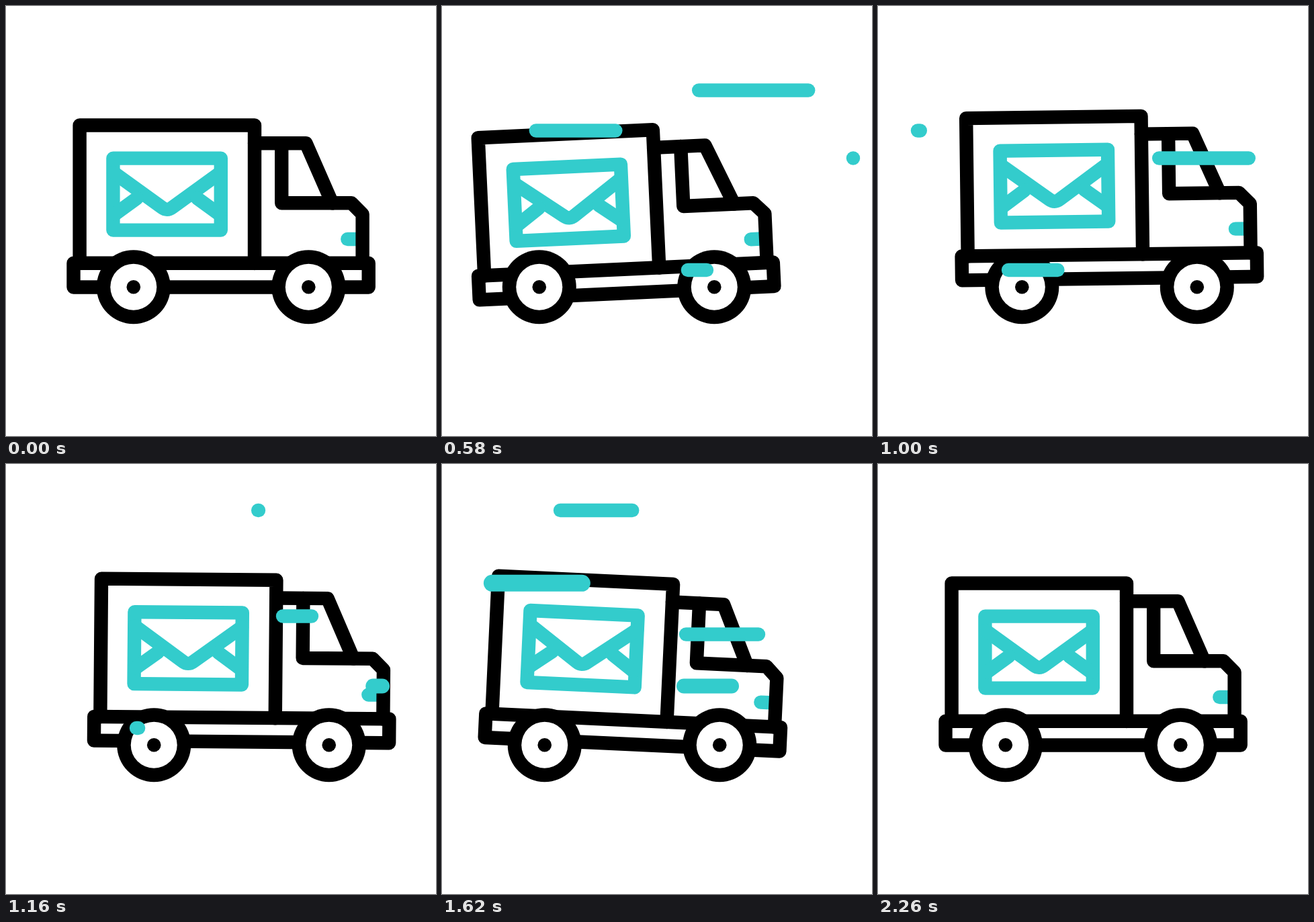
Animation, 640 px wide and 640 px high, one loop 2.4 s. Source, as an HTML page with a canvas:

```html
<!DOCTYPE html>
<html lang="en">
<head>
<meta charset="utf-8">
<title>Delivery truck</title>
<style>
  html, body { margin: 0; width: 100%; height: 100%; overflow: hidden; background: #fff; }
  canvas { display: block; width: 100vmin; height: 100vmin; }
</style>
</head>
<body>
<canvas id="stage" width="640" height="640"></canvas>
<script>
const ctx = document.getElementById('stage').getContext('2d');
const LOOP = 2400, STEP = 20;
const TEAL = '#33cccc', BLACK = '#000', WHITE = '#fff';
const WIDTH = 20.4;
const PIVOT = { x: 320.25, y: 418.5 };

// Keys are [time, value] pairs.
const DRIVE = [[20, 0], [565, -45.2], [1107, 32.4], [1633, -37.2], [2155, 0]];
const TILT = [[20, 0], [565, -2.64], [1633, 2.68], [2155, 0]];
const BOB = [[0, 0], [220, -6], [590, 8.8], [1000, -13], [1380, 7.6], [1840, -9], [2260, 0]];

// Speed lines run leftwards; the tail follows the head after a delay.
const HEAD_TIME = 475, TAIL_DELAY = 252;
const STREAKS = [
  { start: 267, x: 556, y: 125.5, length: 238 },
  { start: 312, x: 259, y: 185.5 },
  { start: 468, x: 394, y: 393 },
  { start: 575, x: 612, y: 226.5 },
  { start: 1084, x: 560, y: 330.5, width: 22 },
  { start: 1142, x: 376, y: 69 },
  { start: 1196, x: 268, y: 177.3, width: 25 },
  { start: 1370, x: 471, y: 253.5 }
];

const clamp = v => Math.min(1, Math.max(0, v));
const ease = v => { const p = clamp(v); return p * p * (3 - 2 * p); };

function valueAt(keys, t) {
  if (t <= keys[0][0]) return keys[0][1];
  for (let i = 1; i < keys.length; i++) {
    const [t0, a] = keys[i - 1], [t1, b] = keys[i];
    if (t < t1) return a + (b - a) * ease((t - t0) / (t1 - t0));
  }
  return keys[keys.length - 1][1];
}

function stroke(path, color, width = WIDTH) {
  ctx.strokeStyle = color;
  ctx.lineWidth = width;
  ctx.stroke(new Path2D(path));
}

function disc(x, y, r, color) {
  ctx.fillStyle = color;
  ctx.beginPath();
  ctx.arc(x, y, r, 0, Math.PI * 2);
  ctx.fill();
}

function drawEnvelope() {
  stroke('M159.4 226.6H319.8V333.6H159.4Z', TEAL);
  stroke('M160 247.7L232 299.8Q239.7 305.6 247.4 299.8L319.4 247.7', TEAL);
  stroke('M162 310L195 286M317.4 310L284.4 286', TEAL);
}

function drawBody() {
  drawEnvelope();
  stroke('M508.3 347H528', TEAL);
  stroke('M109.6 383V177.5H370V383', BLACK);
  stroke('M370 204.2H446.4L485.5 293.3', BLACK);
  stroke('M410.2 204.2V293.3H514.3L530.6 309.8V383', BLACK);
  stroke('M100.5 382.8H539.7V418.5H100.5Z', BLACK);
}

function drawWheel(x) {
  disc(x, 418.2, 55, BLACK);
  disc(x, 418.2, 34.5, WHITE);
  disc(x, 418.2, 10.3, BLACK);
}

function drawStreak({ start, x, y, length = 200, width = WIDTH }, t) {
  const age = t - start;
  if (age < 0 || age >= HEAD_TIME + TAIL_DELAY) return;
  const head = x - length * ease(age / HEAD_TIME);
  const tail = x - length * ease((age - TAIL_DELAY) / HEAD_TIME);
  stroke(`M${head} ${y}H${tail + 0.01}`, TEAL, width);
}

function draw(t) {
  ctx.fillStyle = WHITE;
  ctx.fillRect(0, 0, 640, 640);
  ctx.lineCap = ctx.lineJoin = 'round';

  const drive = valueAt(DRIVE, t);
  ctx.save();
  ctx.translate(PIVOT.x + drive, PIVOT.y + valueAt(BOB, t));
  ctx.rotate(valueAt(TILT, t) * Math.PI / 180);
  ctx.translate(-PIVOT.x, -PIVOT.y);
  drawBody();
  ctx.restore();

  drawWheel(189.8 + drive);
  drawWheel(450.3 + drive);
  STREAKS.forEach(streak => drawStreak(streak, t));
}

const origin = performance.now();
function tick() {
  const t = (performance.now() - origin) % LOOP;
  draw(Math.floor(t / STEP) * STEP);
  requestAnimationFrame(tick);
}
tick();
</script>
</body>
</html>
```
